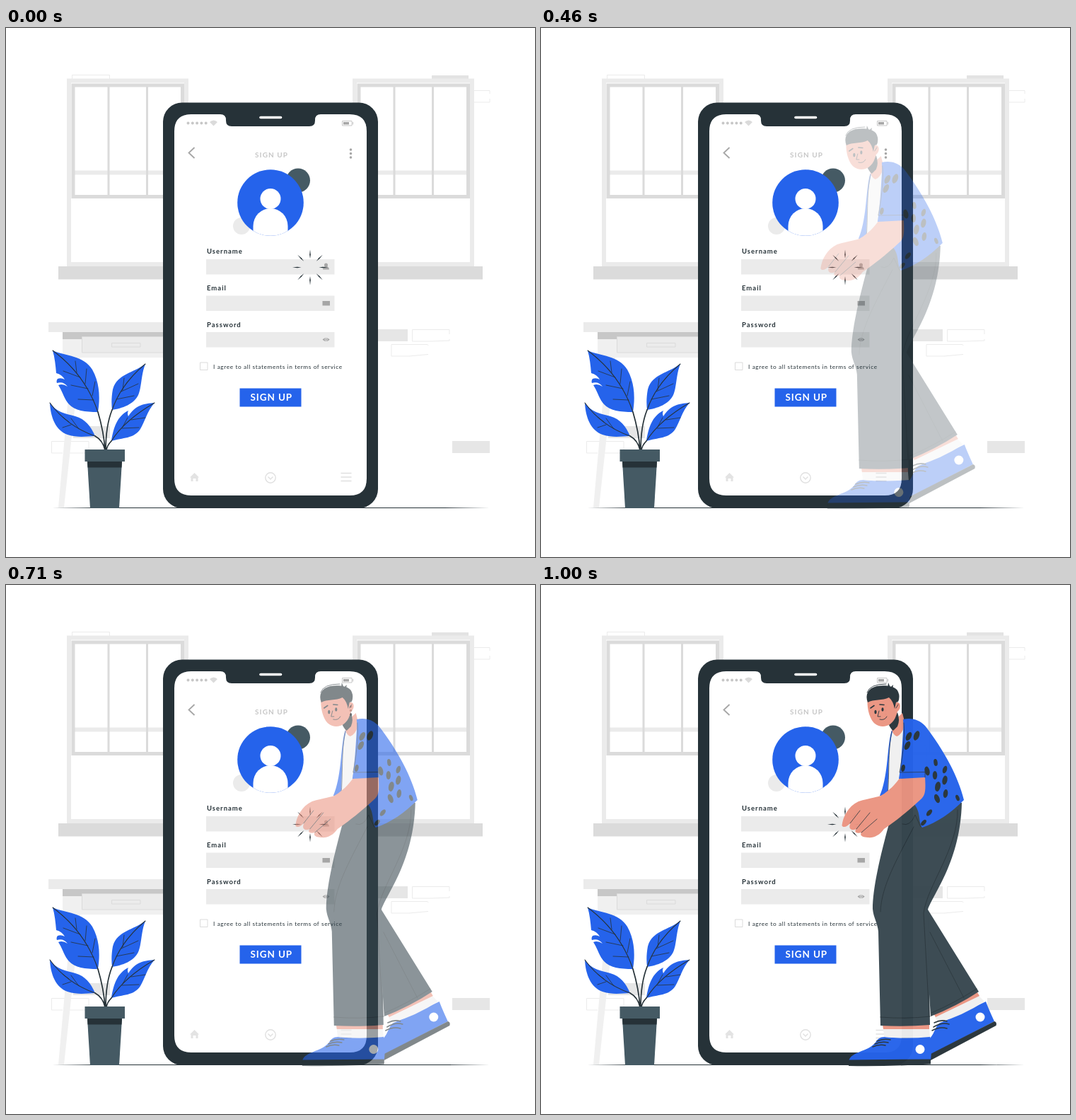
These frames come from a looping animation (748x748 px, 1.04 s). An HTML page:

```html
<!DOCTYPE html>
<html lang="en">
<head>
<meta charset="utf-8">
<title>Sign up</title>
<style>
  html, body { margin: 0; height: 100%; overflow: hidden; background: #fff; }
  svg { display: block; width: 100vw; height: 100vh; }
  text { font-family: Lato, "Open Sans", sans-serif; fill: #263238; }
  .blue { fill: #2563eb; }
  .dark { fill: #263238; }
  .slate { fill: #455a64; }
  .pants { fill: #37474f; }
  .skin { fill: #eb9481; }
  .pale { fill: #ebebeb; }
  .grey { fill: #dbdbdb; }
  .icon { fill: #a6a6a6; }
  .line { fill: none; stroke: #263238; stroke-linecap: round; stroke-linejoin: round; }
  .brick { fill: none; stroke: #ebebeb; }
  .label { font-size: 9.5px; font-weight: 700; letter-spacing: 1px; }
</style>
</head>
<body>
<svg viewBox="0 0 748 748">
  <defs>
    <g id="window" fill="none">
      <path d="M89 337V74.5H255V337M89 334H255" stroke="#ebebeb" stroke-width="6"/>
      <path d="M97 204.5H250" stroke="#ebebeb" stroke-width="6"/>
      <path d="M95 81H249.500V238.500H95Z" stroke="#dbdbdb" stroke-width="5"/>
      <path d="M145 81V238M199.500 81V238" stroke="#dbdbdb" stroke-width="3"/>
      <path class="grey" d="M74 337H270V355.500H74Z"/>
    </g>
    <clipPath id="disc"><circle cx="374" cy="247" r="46.800"/></clipPath>
  </defs>

  <!-- room -->
  <path class="brick" d="M93.500 72V66.500H146.500V72M662 88.500H684V93M684 100V105H662M627 433V426.500H574.500V443H600M627 440V442L600 443M597 449L596 447.500H545V464H570L597 461.500M64.500 584.500H117V601H90M64.500 584.500V601H80"/>
  <path fill="#e3e3e3" d="M602 67H654V72H602Z"/>
  <path fill="#e6e6e6" d="M510 426H568V443H510ZM631 584H684V601H631ZM95 563H147V580H95Z"/>
  <use href="#window"/>
  <use href="#window" x="404"/>
  <path fill="#f0f0f0" d="M80 440H240V466H80ZM93 466H105L82 678H74Z"/>
  <path fill="#c7c7c7" d="M80 430H240V440H80Z"/>
  <path class="pale" d="M60 416H240V430H60Z"/>
  <path fill="#ebebeb" stroke="#dbdbdb" d="M107.500 436.500H240V459H107.500ZM149.500 445.500H190V451H149.500Z"/>
  <path class="dark" d="M65 678.500L130 678H620L684 678.500L620 679H130Z"/>

  <!-- plant -->
  <path class="blue" d="M66 456C84 464 110 463 122 483C133 502 133 525 130 543C112 543 97 541 89 532C82 524 80 514 74 505Q80 502 87 507Q81 499 72 502C71 500 72 497 73 496Q78 494 83 497Q79 490 71 488C70 477 69 466 66 456Z
    M197 475C180 488 157 489 151 511C149 522 149 532 150 540C164 538 181 532 187 519C192 507 191 490 197 475Z
    M62 530C63 550 70 569 87 575C103 580 115 577 126 577C120 563 112 553 98 549C83 545 71 543 62 530Z
    M210 530C195 531 183 533 173 549Q171 545 173 541C157 549 152 565 149 584C165 579 181 581 190 567C197 555 199 543 210 530Z"/>
  <path class="line" stroke-width="1.700" d="M130 543C135 560 139 580 140 597M150 540C142 560 141 580 141 597M126 577Q137 583 140 597M149 584Q143 590 142 597"/>
  <path class="line" stroke-width="1.100" d="M66 456Q112 490 130 543M197 475Q163 503 150 540M62 530Q86 563 126 577M210 530Q167 555 149 584"/>
  <path class="line" stroke-width=".8" d="M100 487L98 471M112 503L114 482M122 520L126 500M105 494L81 485M116 510L92 505M124 526L102 525M165 512L167 495M156 525L181 520M163 514L187 503M89 557L80 550M103 567L92 552M92 561L80 565M165 564L172 551M164 566L188 565M177 554L197 551"/>
  <path class="slate" d="M115 613H164L160 679H119Z"/>
  <path class="dark" d="M115 613H164L163.500 621.500H115.500Z"/>
  <path class="slate" d="M111.500 596H168V613H111.500Z"/>

  <!-- phone -->
  <rect class="dark" x="222" y="105.500" width="304" height="573.500" rx="27"/>
  <path fill="#fff" d="M262 122H303Q311 122 311 130V131Q311 139 319 139H429Q437 139 437 131V130Q437 122 445 122H486Q510 122 510 146V637Q510 661 486 661H262Q238 661 238 637V146Q238 122 262 122Z"/>
  <path class="line" style="stroke:#fff" stroke-width="3.600" d="M360 126.500H388.500"/>
  <path fill="none" stroke="#c7c7c7" stroke-width="4" stroke-linecap="round" stroke-dasharray="0 6.300" d="M257.500 134.500H283"/>
  <path fill="#dbdbdb" d="M288 133Q293.500 128 299 133L293.500 138.500Z"/>
  <path fill="none" stroke="#c7c7c7" d="M475.500 131.500H489V138H475.500ZM490.500 133V136.500"/>
  <path class="icon" d="M477 133H485V136.500H477Z"/>
  <path fill="none" stroke="#a6a6a6" stroke-width="1.800" d="M266.500 169L258.500 176.500L266.500 184"/>
  <path fill="none" stroke="#a6a6a6" stroke-width="3.600" stroke-linecap="round" stroke-dasharray="0 5.500" d="M487.500 172V183.500"/>
  <text x="352" y="183" font-size="10" font-weight="700" letter-spacing="1.100" style="fill:#c7c7c7">SIGN UP</text>

  <circle class="slate" cx="413" cy="215.500" r="17"/>
  <circle class="pale" cx="333" cy="280" r="12"/>
  <circle class="blue" cx="374" cy="247" r="46.800"/>
  <g fill="#fff" clip-path="url(#disc)">
    <circle cx="374" cy="241.500" r="14.500"/>
    <path d="M349.500 295V280A24.500 25 0 0 1 398.500 280V295Z"/>
  </g>

  <text class="label" x="284" y="319">Username</text>
  <text class="label" x="284" y="370.500">Email</text>
  <text class="label" x="284" y="422.500">Password</text>
  <path class="pale" d="M283 327H464.500V348.500H283ZM283 378.500H464.500V400H283ZM283 430H464.500V451.500H283Z"/>
  <path class="icon" d="M450 335A2.500 2.500 0 1 1 455 335L454.500 337.500Q457 338.500 457 341.500H448Q448 338.500 450.500 337.500ZM447.500 386H458V392.500H447.500ZM447.500 440.500Q452.500 435.500 457.800 440.500Q452.500 445.500 447.500 440.500Z"/>
  <circle cx="452.600" cy="440.500" r="1.600" fill="none" stroke="#ebebeb"/>
  <path d="M274.500 473H285V483.500H274.500Z" fill="none" stroke="#dbdbdb"/>
  <text x="293" y="481.500" font-size="8.300" letter-spacing=".6">I agree to all statements in terms of service</text>
  <path class="blue" d="M330.500 509.500H417.500V535.500H330.500Z"/>
  <text x="345.500" y="527" font-size="13.500" font-weight="700" letter-spacing=".9" style="fill:#fff">SIGN UP</text>
  <path fill="#e3e3e3" d="M260 635.500L266.500 629L273 635.500H271.500V641H268.500V637H264.500V641H261.500V635.500Z"/>
  <g fill="none" stroke="#e0e0e0" stroke-width="1.400">
    <circle cx="374" cy="636" r="7.200"/>
    <path d="M370.500 634.500L374 638L377.500 634.500M473.500 629.500H488.500M473.500 635H488.500M473.500 640.500H488.500"/>
  </g>
  <g id="spark" class="dark" transform="translate(430 338.500)"></g>

  <!-- person -->
  <g id="person" opacity="0">
    <path class="blue" d="M550 641C558 632 558 620 567 618L629 589C633 600 638 610 641 617L551 664Z"/>
    <path class="dark" d="M551 663L641 617Q645 618 643.500 623L551 672Z"/>
    <path fill="#f0f0f0" d="M557 611L619 581L627 589Q596 609 562 619Z"/>
    <path class="skin" d="M555 606L617 576L620 581L558 611Z"/>
    <path class="pants" d="M540 450L547 459L619 575Q587 596 551 610L544 500Z"/>
    <path class="line" stroke-width=".8" d="M550 491L598 584M552 605Q583 592 616 571"/>
    <path class="line" stroke-width="1.500" d="M556 619Q566 614 574 617M555 625Q567 618 577 621M553 630Q564 624 574 627"/>
    <circle fill="#fff" cx="621" cy="611" r="6.500"/>

    <path class="blue" d="M435.500 672C439 660 461 660 472 648C476 642 479 639 486 639Q518 642 550 638C553 650 552 662 551 672Z"/>
    <path class="dark" d="M435.500 671.500L551 670.500V677.500Q490 681 435 680Z"/>
    <path fill="#f0f0f0" d="M484 627H549L550 639Q516 642 485 639Z"/>
    <path class="skin" d="M483 622H549V628H484Z"/>
    <path class="line" stroke-width="1.500" d="M475 645Q484 641 494 643M472 649Q481 645 491 647M469 653Q478 649 487 651"/>
    <circle fill="#fff" cx="536" cy="656.500" r="6.500"/>

    <path class="pants" d="M492 338C479 385 469 430 469 458C470 470 476 478 477 490L480 623Q515 625 550 622L547 459C555 436 593 390 595 308L530 290Z"/>
    <path class="line" stroke-width=".9" d="M527 342C505 385 481 425 480 462M589 318C590 372 546 425 541 464L549 610M480 611Q515 614 550 610M511 338Q522 342 529 325L537 342"/>

    <path class="blue" d="M497 203C489 220 492 268 479 298L500 299L503 206Z"/>
    <path fill="#f0f0f0" d="M497 207L514 198L520 275L490 297C492 270 490 235 497 207Z"/>
    <path class="line" stroke-width=".7" d="M496 207C490 235 493 270 490 297"/>
    <path class="skin" d="M495 196L511 181L515 197Q510 212 503 214Q498 212 496 205Z"/>
    <path class="blue" d="M512 190C525 187 535 191 543 199C564 226 588 264 598 304C580 322 560 336 539 343C533 335 538 320 526 308L507 270Q515 220 512 190Z"/>
    <path class="skin" d="M508 272L543 271C544 290 544 298 536 304C520 319 500 335 485 345C479 354 470 358 462 357C455 357 450 354 453 350C446 352 442 349 446 345C440 348 433 346 438 336C433 342 427 344 425.500 340C427 328 434 313 449 306C465 301 478 300 482 297C492 291 500 283 508 272Z"/>
    <path class="line" stroke-width=".8" d="M437 337L451 319M446 345L465 322M453 350L475 331"/>
    <path class="blue" d="M513 192C511 220 510 250 506 274L543 272L546 230Z"/>
    <path class="line" stroke-width=".7" d="M513 195C515 215 511 245 507 265L543 264.500V272"/>
    <g id="spots" class="dark"></g>

    <path class="dark" d="M492 198L504 180Q508 191 504 200L498 206Q495 204 492 198Z"/>
    <path class="skin" d="M462 158C460 174 465 190 472 196C482 204 497 200 502 185L504 179C510 175 509 164 502 166L496 152Z"/>
    <path class="dark" d="M462 166C458 155 462 146 475 143C487 141 502 143 505 151Q508 158 505 165L502 166L500 175Q498 164 492 159C483 164 470 161 462 166Z"/>
    <path class="dark" d="M490 147L491 138L494 145L498 141L497 148Z"/>
    <path class="line" stroke-width=".9" d="M461 152Q465 140 488 140M478 178L476 186L480 186M479 190Q486 192 489 186M505 169L502 174"/>
    <path class="line" stroke-width="1.600" d="M466 174L471 170.500M479 169L485 169.500"/>
    <ellipse class="dark" cx="473" cy="179.500" rx="1.600" ry="2.800"/>
    <ellipse class="dark" cx="483" cy="176" rx="1.600" ry="2.800"/>
  </g>
</svg>
<script>
const byId = id => document.getElementById(id);
const LOOP = 1040, STEPS = 25;

byId('spark').innerHTML = Array.from({ length: 8 }, (_, i) =>
  `<path transform="rotate(${i * 45})" d="M12.5 0L18 -.8L25 0L18 .8Z"/>`).join('');

// x, y, radius, tilt
const spots = [
  [531, 213, 7, 22], [520, 214, 6.500, 28], [518, 227, 6.500, 28], [512, 259, 5, 12],
  [546, 263, 6.500, -12], [558, 251, 5, -8], [571, 261, 5.500, 18], [557, 269, 6, 0],
  [571, 276, 6.500, 12], [561, 285, 7, 12], [572, 295, 6, 8], [560, 302, 6.500, -22],
  [549, 322, 5.500, 38], [541, 336, 5, 40], [589, 301, 4.500, -22]
];
byId('spots').innerHTML = spots.map(([x, y, r, a]) =>
  `<ellipse rx="${r * 0.54}" ry="${r}" transform="translate(${x} ${y}) rotate(${a})"/>`).join('');

// The figure drifts right at constant speed while it fades in.
const person = byId('person');
function draw(now) {
  const step = Math.min(STEPS - 1, Math.floor((now % LOOP + 2) / (LOOP / STEPS)));
  person.setAttribute('transform', `translate(${(step - 24) * 2.320} 0)`);
  person.setAttribute('opacity', (step / 24.500) ** 1.500);
}
const start = performance.now();
function tick() {
  draw(performance.now() - start);
  requestAnimationFrame(tick);
}
tick();
</script>
</body>
</html>
```
